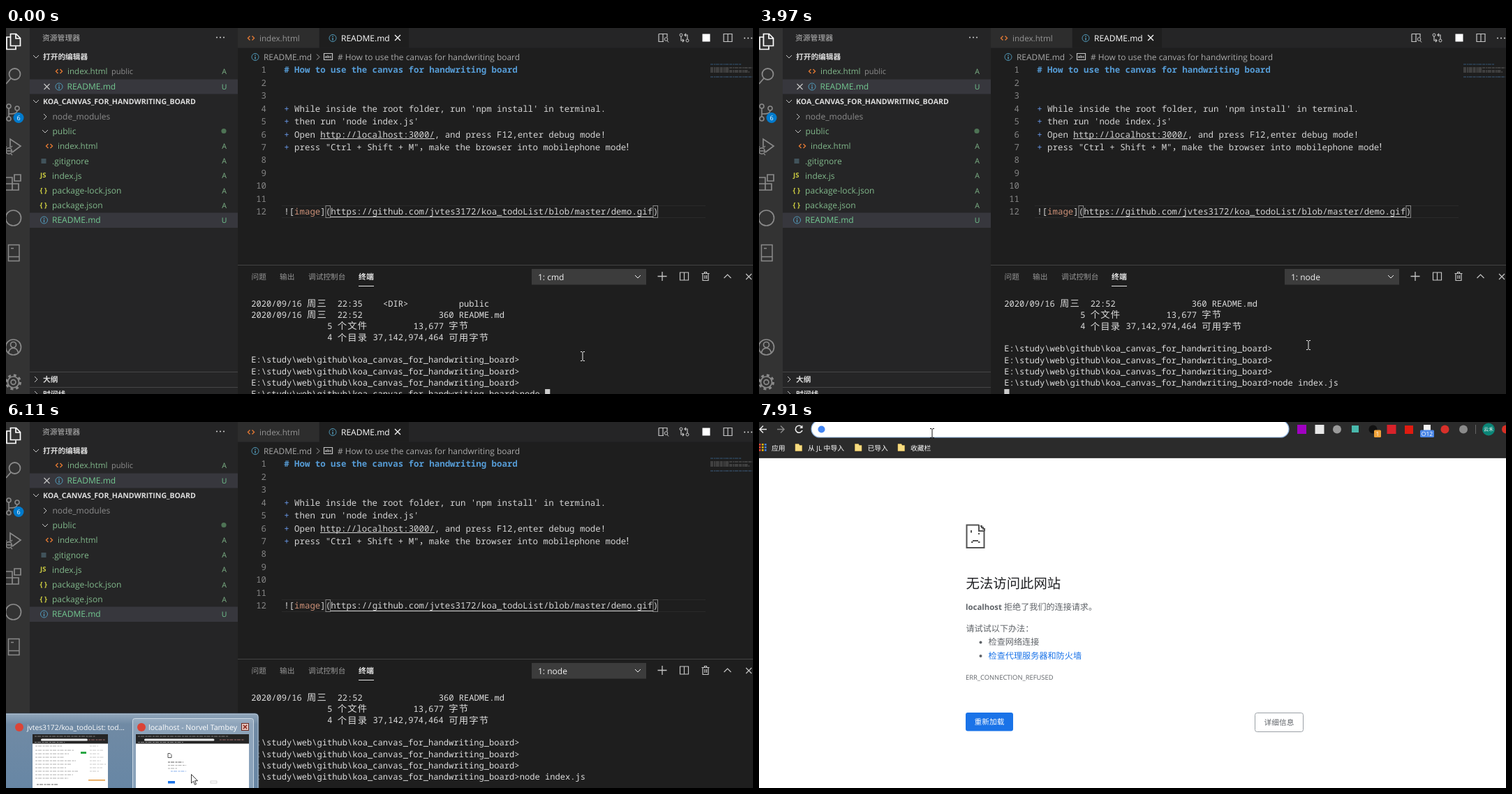
Animation of 1070x524 px, one loop 8 s. Source, as an HTML page:

```html
<!DOCTYPE html>
<html lang="zh">
<head>
<meta charset="utf-8">
<title>Editor and browser</title>
<style>
html, body { margin: 0; width: 100%; height: 100%; overflow: hidden; background: #1e1e1e; }
svg { display: block; width: 1070px; height: 524px; overflow: hidden; }
text { font-family: 'Open Sans', 'Noto Sans CJK SC', 'Noto Sans CJK', sans-serif; white-space: pre; text-rendering: geometricPrecision; }
.mono { font-family: 'Noto Sans Mono', 'Noto Sans CJK SC', 'Noto Sans CJK', monospace; }
.b { font-weight: 700; }
.end { text-anchor: end; }
.mid { text-anchor: middle; }
</style>
</head>
<body>
<svg id="stage" viewBox="0 0 1070 524" xmlns="http://www.w3.org/2000/svg"></svg>
<script>
const LOOP = 8000;
const GREEN = '#81b88b', NEW = '#73c991', GREY = '#c5c5c5', DIM = '#858585', BLUE = '#569cd6', INK = '#ddd';
const TERM = { x: 351.3, y: 394.3, col: 7.255, row: 16.15, size: 12.09 };
const EDIT = { x: 398.2, y: 60, col: 7.444, row: 18.42, size: 12.407 };
const PROMPT = 'E:\\study\\web\\github\\koa_canvas_for_handwriting_board>';

// Drawing helpers; text is placed by its vertical centre, on a whole-pixel baseline.
const esc = s => s.replace(/&/g, '&amp;').replace(/</g, '&lt;');
const T = (x, y, s, fill = '#ccc', size = 12, cls = '', id = '') =>
  `<text x="${x}" y="${Math.round(y + size * .36)}" fill="${fill}" font-size="${size}" class="${cls}" id="${id}">${esc(s)}</text>`;
const R = (x, y, w, h, fill, more = '') => `<rect x="${x}" y="${y}" width="${w}" height="${h}" fill="${fill}" ${more}/>`;
const C = (x, y, r, fill, more = '') => `<circle cx="${x}" cy="${y}" r="${r}" fill="${fill}" ${more}/>`;
const ring = (x, y, r, stroke, w = 1) => C(x, y, r, 'none', `stroke="${stroke}" stroke-width="${w}"`);
const P = (d, stroke, w = 1, fill = 'none', dash = '') =>
  `<path d="${d}" stroke="${stroke}" stroke-width="${w}" fill="${fill}" stroke-dasharray="${dash}"/>`;
const G = (id, body) => `<g id="${id}">${body}</g>`;
const map = (list, f) => list.map(f).join('');

const right = (x, y, c = GREY) => P(`M${x - 2} ${y - 4}l4 4-4 4`, c);
const down = (x, y, c = GREY) => P(`M${x - 4} ${y - 2}l4 4 4-4`, c);
const cross = (x, y, r, c, w = 1.2) => P(`M${x - r} ${y - r}l${2 * r} ${2 * r}m0-${2 * r}l-${2 * r} ${2 * r}`, c, w);
const info = (x, y) => ring(x, y, 5, '#519aba') + P(`M${x} ${y - 3}v1.4m0 1v3.8`, '#519aba', 1.4);
const tag = (x, y) => P(`M${x - 1.5} ${y - 3}l-3 3 3 3m3-6l3 3-3 3`, '#e37933', 1.4);
const braces = (x, y) => T(x, y - .5, '{ }', '#cbcb41', 10, 'b');
const split = (x, y) => P(`M${x - 6} ${y - 5.5}h12v11h-12zm6 0v11`, GREY, 1.2);
const dots = (x, y) => map([-5, 0, 5], d => C(x + d, y, 1.1, GREY));

function activityBar() {
  const a = '#8a8a8a';
  return R(0, 0, 34, 524, '#333') +
    P('M6.5 8.5h8l6 6v11h-14zM14 9v6h6M6 13H1v17.5h13v-4', '#fff', 1.7) +
    ring(12.5, 66, 8, a, 1.8) + P('M7 72l-7 8', a, 1.8) +
    map([[4, 112], [16, 115], [4, 130]], ([x, y]) => ring(x, y, 3, a, 1.6)) + P('M4 115v12M16 118c0 5-6 5-12 5', a, 1.6) +
    C(18, 128.5, 7.5, '#007acc') + T(18, 128.5, '6', '#fff', 9, 'mid') +
    P('M6 171v-12l15 10-12 9', a, 1.7) + ring(4, 176, 4.3, a, 1.6) + P('M-1 176h10M1 171l-2-2m8 2l2-2m-2 11l2 2', a, 1.3) +
    P('M0 214h9v18h-9M0 223h18v9h-9M12 210h9v9h-9z', a, 1.7) +
    ring(10.5, 272, 11, a, 1.7) +
    P('M3.5 310.5h15.5v23h-15.5zM3 327.5h16M7 315.5h4', a, 1.5) +
    ring(10.5, 457, 11, a, 1.7) + ring(10.5, 453.5, 4, a, 1.7) + P('M3.5 465c2-9 12-9 14 0', a, 1.7) +
    ring(10.5, 507, 3.4, a, 1.7) + ring(10.5, 507, 8, a, 1.7) +
    C(10.5, 507, 10, 'none', `stroke="${a}" stroke-width="3" stroke-dasharray="3.93"`);
}

function sidebar() {
  const badge = (y, s, c = GREEN) => T(312.5, y, s, c, 10.5, 'mid');
  const file = (x, y, s, size = 12) => T(x, y, s, GREEN, size) + badge(y, 'A');
  return R(34, 0, 298, 524, '#252526') +
    T(52, 14, '资源管理器', '#bbb', 10.8) + dots(307, 13.5) +
    down(43, 41) + T(53, 41, '打开的编辑器', '#ddd', 10.7, 'b') +
    R(34, 73.5, 298, 21, '#37373d') +
    tag(76, 62) + file(88, 62, 'index.html', 11.6) + T(151, 62.5, 'public', '#8c8c8c', 11) +
    cross(58.5, 84, 4, GREY) + info(76, 84) + T(87.5, 84, 'README.md', NEW) + badge(84, 'U', NEW) +
    down(43, 105) + T(53, 105.5, 'KOA_CANVAS_FOR_HANDWRITING_BOARD', '#ddd', 10.58, 'b') +
    right(56, 127) + T(66.5, 127, 'node_modules', '#8c8c8c') +
    down(56, 148) + T(66.5, 148, 'public', GREEN) + C(312, 147.5, 3.6, '#4e7355') +
    tag(62, 169) + file(74, 169, 'index.html', 11.6) +
    R(50.5, 187, 7, 7, '#41535b') + file(66, 190.5, '.gitignore') +
    T(49, 211, 'JS', '#cbcb41', 9.5, 'b') + file(66, 211.5, 'index.js') +
    braces(48.5, 233) + file(66, 233, 'package-lock.json', 12.1) +
    braces(48.5, 254) + file(66, 254, 'package.json') +
    R(34, 264.5, 298, 21.5, '#37373d') + info(54.5, 275) + T(66, 275, 'README.md', NEW) + badge(275, 'U', NEW) +
    R(34, 492, 298, 1, '#454546') + right(43, 503) + T(53, 503, '大纲', '#ddd', 10.7, 'b') +
    R(34, 514, 298, 1, '#454546') + right(43, 524) + T(53, 524.5, '时间线', '#ddd', 10.7, 'b') +
    G('tools', P('M243 100h5l3 3v3m-8-6v10h4M248 108h6m-3-3v6M266 101h4l1 2h6v3m-11-5v9h5M272 108h6m-3-3v6', GREY) +
      P('M299 102a5 5 0 1 0 1 4m0-6v3h-3M312 103h8v8h-8zm3 0v-3h8v8h-3M314 107h4', GREY));
}

function editor() {
  const E = (col, line, s, fill = '#d4d4d4', cls = '') =>
    T(EDIT.x + col * EDIT.col, EDIT.y + (line - 1) * EDIT.row, s, fill, EDIT.size, 'mono ' + cls);
  const bullet = (line, s) => E(0, line, '+', '#6796e6') + E(2, line, s);
  const paren = x => R(x, 254.5, 6.5, 17, 'none', 'stroke="#888"');
  const url = 'https://github.com/jvtes3172/koa_todoList/blob/master/demo.gif';
  const nums = map([...Array(12).keys()], i =>
    T(373, EDIT.y + i * EDIT.row, `${i + 1}`, DIM, EDIT.size, 'mono end'));
  const mini = (y, w, c) => P(`M1009 ${y}h${w}`, c, 1, 'none', '4 1 2 .6 5 1');
  return R(332, 0, 738, 524, '#1e1e1e') + R(332, 0, 738, 28.5, '#252526') +
    R(332, 0, 116.5, 28.5, '#2d2d2d') + R(449, 0, 128, 28.5, '#1e1e1e') +
    tag(351, 14.5) + T(363, 14.5, 'index.html', '#949494', 11.65) +
    info(468, 14.5) + T(480, 14.5, 'README.md', '#fff') + cross(561, 14, 4, '#fff') +
    P('M935 8.5h12v5m-5 6h-7v-11m6 0v11', GREY, 1.2) + ring(945.5, 16, 2.3, GREY) + P('M947 18l2 2.5', GREY) +
    ring(967, 10, 2, GREY) + ring(976, 18, 2, GREY) +
    P('M967 12v6h4m-2-2l2 2-2 2M976 16v-6h-4m2-2l-2 2 2 2', GREY, 1.2) +
    R(997.5, 8.5, 11, 11, '#fff') + split(1034, 14) + dots(1063, 14.5) +
    info(357, 41.5) + T(369, 41.5, 'README.md', '#a9a9a9', 11.9) + right(447, 41.5, '#a9a9a9') +
    P('M455.5 36.5h12v9h-12z', GREY, 1.2) + T(461.5, 40.8, 'abc', GREY, 5.5, 'mid b') +
    T(475, 41.5, '# How to use the canvas for handwriting board', '#a9a9a9', 11.95) +
    R(395, 254, 607, 1, '#2a2a2a') + R(395, 271, 607, 1, '#2a2a2a') + nums +
    E(0, 1, '# How to use the canvas for handwriting board', BLUE, 'b') +
    bullet(4, "While inside the root folder, run 'npm install' in terminal.") +
    bullet(5, "then run 'node index.js'") +
    bullet(6, 'Open http://localhost:3000/, and press F12,enter debug mode!') + R(450, 158, 164, 1, '#d4d4d4') +
    bullet(7, 'press "Ctrl + Shift + M"') + T(591.7, 170.5, '，', '#d4d4d4', 13.4) +
    T(605.8, 170.5, 'make the browser into mobilephone mode', '#d4d4d4', EDIT.size, 'mono') + T(887, 170.5, '！', '#d4d4d4', 13.4) +
    paren(458) + paren(927) +
    E(0, 12, '![') + E(2, 12, 'image', '#ce9178') + E(7, 12, '](') + E(9, 12, url) + E(71, 12, ')') +
    R(465, 270, 462, 1, '#d4d4d4') +
    mini(52, 44, '#35597a') + mini(57, 60, '#626262') + mini(59, 27, '#626262') + mini(61, 54, '#626262') +
    mini(63, 56, '#626262') + mini(70, 60, '#3f5f80');
}

// One terminal row on a column grid, wide characters taking two cells.
function termRow(s, i) {
  let col = 0, out = '';
  for (const part of s.match(/[\u4e00-\u9fff]| +|[!-~]+/g) || []) {
    const wide = part > '\u2fff';
    if (part.trim()) out += T(TERM.x + col * TERM.col, TERM.y + i * TERM.row, part, INK, wide ? 13.3 : TERM.size, 'mono');
    col += wide ? 2 : part.length;
  }
  return G('row' + i, out);
}

function panel() {
  const rows = [
    '2020/09/16 周三  22:35    <DIR>          public',
    '2020/09/16 周三  22:52               360 README.md',
    '               5 个文件         13,677 字节',
    '               4 个目录 37,142,974,464 可用字节',
    '', PROMPT, PROMPT, PROMPT, PROMPT
  ];
  return R(332, 339, 738, 1, '#434343') +
    map([[351.5, '问题'], [392, '输出'], [433, '调试控制台']], ([x, s]) => T(x, 356.5, s, '#969696', 10.7)) +
    T(505, 356.5, '终端', '#e7e7e7', 10.9, 'b') + R(505, 369, 22, 1, '#e7e7e7') +
    R(753, 345, 164, 22.5, '#3c3c3c') + T(762, 357, '', '#f0f0f0', 12, '', 'shell') + down(905, 356, '#f0f0f0') +
    P('M933.5 355.5h13m-6.5-6.5v13', GREY, 1.3) + split(971.5, 355.5) +
    P('M996.5 351.5h11m-7 0v-2h3v2m-5.5 0v10h8v-10m-5 2.5v5m2.5-5v5', GREY, 1.2) +
    P('M1028.5 358l5-5 5 5', GREY, 1.2) + cross(1064, 356, 4, GREY) +
    G('rows', map(rows, termRow) + T(TERM.x + 53 * TERM.col, TERM.y + 8 * TERM.row, '', INK, TERM.size, 'mono', 'typed')) +
    G('caret', R(0, 517, 7.2, 15, '#ccc', 'id="block"'));
}

function preview() {
  const tiny = (x, y, w, c = '#9a9a9a') => P(`M${x} ${y}h${w}`, c, .8, 'none', '3 1 5 1.5');
  const thumb = (x, w) => R(x, 447, w, 77, '#fff') + R(x, 447, w, 13.5, '#252525') + R(x + 12, 453.5, w * .62, 3, '#eee', 'rx="1.5"') +
    tiny(x + 3, 450, w * .8, '#999') + tiny(x + 3, 458.5, w * .4, '#aaa') + tiny(x + w * .74, 455, w * .22, '#c88');
  return `<defs><linearGradient id="glass" x2="0" y2="1"><stop stop-color="#93a8bc"/><stop offset=".13" stop-color="#708aa4"/><stop offset="1" stop-color="#6686a5"/></linearGradient></defs>` +
    R(-8, 417, 370, 120, 'url(#glass)', 'rx="5" stroke="#2c3a48"') + R(-8, 418, 369, 120, 'none', 'rx="4" stroke="#c3d3e2" stroke-opacity=".8"') +
    G('hot', R(181.5, 424.5, 173, 110, '#dce7f1', 'rx="3" fill-opacity=".28" stroke="#dfe9f2" stroke-opacity=".8"') +
      R(337.5, 431.5, 10, 10, '#e6c8c0', 'stroke="#6a2a22"') + cross(342.5, 436.5, 2.6, '#8c2a20', 1.5)) +
    C(19, 437, 6, '#db4437') + T(30, 437, 'jvtes3172/koa_todoList: tod...', '#fff', 10.3) +
    C(194, 437, 6, '#db4437') + T(204, 437, 'localhost - Norvel Tambey', '#fff', 10.6) +
    thumb(38, 108) + map([464, 470, 475, 480, 485, 490, 495, 500, 505, 510], (y, i) =>
      tiny(42, y, 38 + i * 17 % 24) + (i < 8 ? tiny(120, y, 12 + i * 7 % 12, '#bbb') : '')) +
    R(107, 472, 8, 3, '#28a745') + R(118, 512, 24, 1.5, '#e2973a') + tiny(44, 519, 30, '#333') +
    thumb(186, 162) + P('M232 474.5h3l2 2v4h-5z', '#555') + tiny(232, 487, 22, '#333') + tiny(232, 491.5, 26) +
    tiny(232, 496, 13) + tiny(236, 500, 22, '#6a9ce8') + R(232, 514, 10, 3.5, '#1a73e8') + R(293, 514, 9, 3, 'none', 'stroke="#aaa" stroke-width=".5"');
}

function browser() {
  const bookmark = (x, s) => P(`M${x} 31.5h5l1 2h3.5v8h-9.5z`, '#e8c35a', .5, '#f7dc80') + T(x + 18, 37, s, '#fff', 9.8);
  const colours = ['#ea4335', '#fbbc05', '#4285f4', '#34a853'];
  const apps = map([...Array(9).keys()], i => R(i % 3 * 4, 31 + (i / 3 | 0) * 4, 2.6, 2.6, colours[(i + (i / 3 | 0)) % 4]));
  const badge = (x, w, c, s) => R(x, 11.5, w, 10.5, c, 'rx="1.5"') + T(x + w / 2, 16.8, s, '#fff', 8.5, 'mid');
  const d = '#535353', text = '#5f6368';
  return R(0, 0, 1070, 524, '#fff') + R(0, 0, 1070, 51.5, '#2b2b2b') + R(0, 50.5, 1070, 1, '#1c1c1c') +
    P('M11 10.5H1m5-5l-5 5 5 5', '#eee', 1.5) + P('M26 10.5h10m-5-5l5 5-5 5', '#888', 1.5) +
    P('M61.5 7.5a5 5 0 1 0 .5 4.5', '#eee', 1.6) + P('M62.5 4.5v4.5h-4.5z', 'none', 0, '#eee') +
    R(75, -2, 684, 24, '#fff', 'rx="12" stroke="#8fb4e0" stroke-width="1.2"') + C(89.5, 10.5, 5, '#4285f4') +
    R(771, 4, 13, 13, '#a100c2') + R(796.5, 4, 13, 13, '#e8e8e8') + C(828, 10.5, 6, '#9a9a9a') + R(849, 5, 10, 10, '#49b8ac') +
    C(879.5, 10.5, 6, '#111') + badge(881, 10, '#f0a33a', '1') + R(899.5, 4, 13, 13, '#d8222a') + R(925, 5, 12, 12, '#e01b10') +
    R(952, 4, 10, 8, '#f4f4f4') + badge(947, 20, '#4a86e8', 'O12') + C(982.5, 10.5, 6, '#d8302a') + C(1009, 10.5, 6, '#8a8a8a') +
    R(1026, 4, 1, 13, '#666') + C(1045, 10.5, 9, '#0b8577') + T(1045, 10.5, '云禾', '#fff', 7, 'mid') + C(1070, 10.5, 6, '#d93025') +
    apps + T(18, 37, '应用', '#fff', 9.8) + bookmark(52, '从 JL 中导入') + bookmark(137.5, '已导入') + bookmark(199, '收藏栏') +
    P('M315 147.5h-17.5v32.5h25v-23.5', d, 2) + P('M315 147v9h8.5M317 149h2v2h2v2h2v3', d, 2) +
    R(303, 155, 2, 3.5, d) + R(314, 159, 2, 2, d) + R(306, 169, 8, 2, d) + R(304, 171, 2.5, 2, d) + R(314, 171, 2.5, 2, d) +
    T(296.5, 231.5, '无法访问此网站', '#202124', 19.4) +
    T(296, 264.5, 'localhost', text, 11.4, 'b') + T(351, 264.5, '拒绝了我们的连接请求。', text, 12.1) +
    T(296.5, 295.5, '请试试以下办法：', text, 12.1) + C(317.5, 315.5, 2, text) + C(317.5, 335, 2, text) +
    T(328.5, 315, '检查网络连接', text, 12.15) + T(328.5, 334.5, '检查代理服务器和防火墙', '#1a73e8', 12.15) +
    T(296, 365.5, 'ERR_CONNECTION_REFUSED', text, 9.4) +
    R(296, 416, 68, 26.5, '#1a73e8', 'rx="3"') + T(330, 429.5, '重新加载', '#fff', 10.7, 'mid') +
    R(710.5, 416.5, 69, 27, '#fff', 'rx="3" stroke="#9aa0a6"') + T(745, 430.5, '详细信息', text, 10.7, 'mid') +
    R(102, 2, 1, 16, '#111', 'id="bar"');
}

const beam = 'M-3-6.5h2l1 1 1-1h2M0-5.5v11M-3 6.5h2l1-1 1 1h2';
document.getElementById('stage').innerHTML =
  G('ide', editor() + panel() + sidebar() + activityBar() + G('preview', preview())) + G('browser', browser()) +
  G('beam', `<path d="${beam}" fill="none"/>`) +
  G('arrow', P('M.5.5v12.5l3-2.7 2 5 2-.9-2-4.7h4z', '#222', .9, '#fff'));

// Step tables: [time, value]
const tracks = {
  typed: [[0, 'node '], [680, 'node i'], [1080, 'node in'], [1350, 'node index.js']],
  ran: [[0, false], [2190, true]],
  tools: [[0, false], [4270, true], [4570, false]],
  focus: [[0, true], [5000, false]],
  preview: [[0, false], [5120, true], [6240, false]],
  hot: [[0, false], [5840, true]],
  browser: [[0, false], [6380, true]],
  bar: [[0, true], [6840, false], [7350, true], [7910, false]],
  pointer: [
    [0, ['beam', 826, 470]], [3970, ['beam', 787, 454]], [4120, ['beam', 419, 378.5]],
    [4270, ['arrow', 211.5, 158]], [4430, ['arrow', 53, 491]], [4570, ['none', 0, 0]],
    [5840, ['arrow', 272, 512]], [5990, ['arrow', 265, 504]],
    [6530, ['arrow', 261, 57]], [6690, ['arrow', 206, 27]],
    [6840, ['beam', 236, 18]], [6960, ['beam', 251, 14]], [7080, ['beam', 247, 14]], [7470, ['beam', 248, 16]]
  ]
};
const at = (name, t) => tracks[name].filter(step => step[0] <= t).pop()[1];
const el = id => document.getElementById(id);
const show = (id, on) => { el(id).style.display = on ? '' : 'none'; };

function draw(t) {
  const ran = at('ran', t), typed = at('typed', t), focus = at('focus', t), web = at('browser', t);
  for (const id of ['tools', 'preview', 'hot', 'browser', 'bar']) show(id, at(id, t));
  show('ide', !web);
  show('row0', !ran);
  el('typed').textContent = typed;
  el('shell').textContent = ran ? '1: node' : '1: cmd';
  el('rows').setAttribute('transform', `translate(0 ${ran ? -16 : 0})`);
  const x = TERM.x + (ran ? 0 : 53 + typed.length) * TERM.col;
  el('caret').setAttribute('transform', focus ? `translate(${x} 0)` : `translate(${x + .2} .5)`);
  el('block').setAttribute('fill', focus ? '#ccc' : 'none');
  el('block').setAttribute('stroke', focus ? 'none' : '#ccc');

  const [kind, px, py] = at('pointer', t);
  for (const id of ['beam', 'arrow']) {
    show(id, id === kind);
    el(id).setAttribute('transform', `translate(${px} ${py})`);
  }
  el('beam').setAttribute('stroke', web ? '#111' : '#eee');
}

function tick() {
  draw(performance.now() % LOOP);
  requestAnimationFrame(tick);
}
tick();
</script>
</body>
</html>
```
